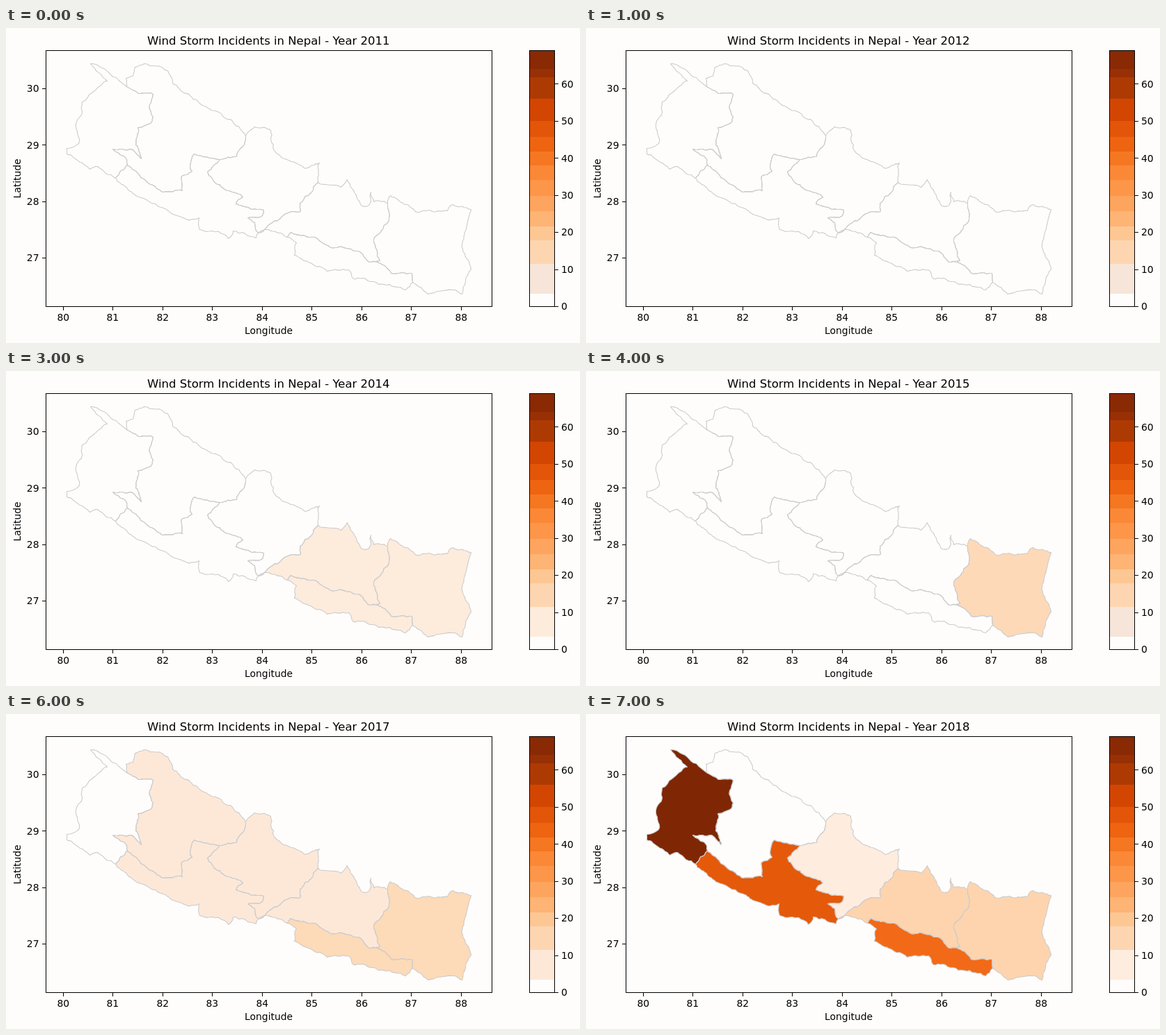
Recreate the animation shown at these times as an HTML page with a canvas. Size 825x454 px, loop 8000 ms.

```html
<!DOCTYPE html>
<html lang="en">
<head>
<meta charset="utf-8">
<title>Wind Storm Incidents</title>
<style>
  html, body { margin: 0; width: 825px; height: 454px; overflow: hidden; background: #fefdfc; }
  canvas, svg { position: absolute; left: 0; top: 0; display: block; }
  text { font: 13.89px "DejaVu Sans", sans-serif; fill: #000; }
  #title { font-size: 16.5px; }
</style>
</head>
<body>
<canvas id="map" width="825" height="454"></canvas>
<svg id="labels" width="825" height="454"></svg>
<script>
const ctx = document.getElementById("map").getContext("2d");
const labels = document.getElementById("labels");
const PAPER = "#fefdfc", EDGE = "#cccccc";
const PLOT = { x: 57.5, y: 32.5, w: 641, h: 369 };
const BAR = { x: 752.5, y: 32.5, w: 36, h: 369 };
const STEP = 1000;

let seed = 7;
const random = () => (seed = (seed * 16807) % 2147483647) / 2147483647;

// Splits a segment again and again, nudging each midpoint sideways.
function roughen([ax, ay], [bx, by]) {
  const dx = bx - ax, dy = by - ay, length = Math.hypot(dx, dy);
  if (length < 5) return [[bx, by]];
  const kink = (random() - 0.5) * Math.min(0.3, 4 / length);
  const middle = [(ax + bx) / 2 - dy * kink, (ay + by) / 2 + dx * kink];
  return [...roughen([ax, ay], middle), ...roughen(middle, [bx, by])];
}

const borders = {};
function border(name, corners) {
  const keys = corners.split(" ").map(corner => corner.split(",").map(Number));
  borders[name] = keys.flatMap((key, i) => i ? roughen(keys[i - 1], key) : [key]);
}

border("farWestOuter", "157,216 131,199 120,203 87,181 87,173 104,166 100,138 108,125 109,106 123,93 145,76 121,51 131,53 158,71 173,84");
border("midWestOuter", "173,84 172,72 182,69 185,56 198,51 232,61 239,79 279,109 322,131 344,155");
border("westOuter", "344,155 357,142 380,147 384,175 430,202 450,194 448,222");
border("centralOuter", "448,222 481,229 490,218 511,256 520,256 524,236 528,250 548,252");
border("eastOuter", "548,252 552,241 593,265 634,263 642,254 668,261 656,318 668,347 655,383 641,377 606,383 584,366");
border("southEastOuter", "584,366 574,377 512,360 499,361 492,348 461,350 414,327 417,309 404,301");
border("centralSouth", "404,301 376,290 362,295");
border("southOuter", "362,295 359,302 326,292 319,303 313,297 278,290 277,273 258,275 222,258 188,242 157,216");
border("farWest/south", "157,216 174,197");
border("farWest/midWest", "174,197 169,184 153,174 167,174 180,174 194,188 186,168 189,143 207,137 211,128 206,110 211,95 190,94 173,84");
border("midWest/south", "174,197 207,225 225,236 253,234 252,213 267,206 264,199 270,181 307,189");
border("midWest/west", "307,189 331,185 344,155");
border("west/south", "307,189 289,207 302,224 340,243 330,253 370,262 368,270 347,273 357,280 362,295");
border("west/central", "362,295 373,288 405,266 423,264 422,252 438,237 448,222");
border("central/southEast", "404,301 409,294 447,303 462,313 505,321 524,337");
border("central/east", "524,337 537,335 528,304 549,279 548,252");
border("east/southEast", "524,337 545,343 553,353 583,353 584,366");

// A leading "-" walks the border backwards.
function region(...names) {
  const path = new Path2D();
  for (const name of names) {
    const points = name[0] === "-" ? [...borders[name.slice(1)]].reverse() : borders[name];
    for (const [x, y] of points) path.lineTo(x + 0.5, y + 0.5);
  }
  path.closePath();
  return path;
}

const regions = {
  farWest: region("farWestOuter", "-farWest/midWest", "-farWest/south"),
  midWest: region("midWestOuter", "-midWest/west", "-midWest/south", "farWest/midWest"),
  south: region("southOuter", "farWest/south", "midWest/south", "west/south"),
  west: region("westOuter", "-west/central", "-west/south", "midWest/west"),
  central: region("centralOuter", "-central/east", "-central/southEast", "centralSouth", "west/central"),
  southEast: region("southEastOuter", "central/southEast", "east/southEast"),
  east: region("eastOuter", "-east/southEast", "central/east")
};

// "low" is the colour of the lowest band on the scale; fills name it by null.
const years = [
  { low: "#f6e5d8", fills: {} },
  { low: "#f6e5d8", fills: {} },
  { low: "#fdebdc", fills: { southEast: null, east: null } },
  { low: "#fdebdc", fills: { southEast: null, east: null, central: null } },
  { low: "#f6e5d8", fills: { east: "#fdd9b8" } },
  { low: "#fdeadb", fills: { west: null, central: null, southEast: null, east: null } },
  { low: "#fde8d8", fills: { midWest: null, south: null, west: null, central: null,
      southEast: "#fddab8", east: "#fddab8" } },
  { low: "#feecdf", fills: { farWest: "#7f2704", south: "#e5590b", west: null,
      central: "#fdd4ae", southEast: "#f26a17", east: "#fdd4ae" } }
];

// Each band runs from its top edge down to the next one.
const bands = [
  [32, "#892a04"], [59, "#973005"], [71, "#ae3a03"], [102, "#d34601"], [134, "#e35509"],
  [157, "#ee6410"], [178, "#f57722"], [198, "#fb8836"], [219, "#fd9649"], [242, "#fda55e"],
  [264, "#fdb475"], [286, "#fdc794"], [306, "#fdd6b1"], [340, null], [383, PAPER]
];

function label(text, x, y, anchor = "middle") {
  const node = document.createElementNS("http://www.w3.org/2000/svg", "text");
  node.setAttribute("x", x);
  node.setAttribute("y", y);
  node.setAttribute("text-anchor", anchor);
  node.textContent = text;
  labels.append(node);
  return node;
}

const title = label("", 377.3, 24);
title.id = "title";
label("Longitude", 377.6, 441);
label("Latitude", 21, 217).setAttribute("transform", "rotate(-90 21 217)");

const ticks = new Path2D();
function tick(x, y, dx, dy) {
  ticks.moveTo(x, y);
  ticks.lineTo(x + dx, y + dy);
}
function sideTick(text, x, y, dx, labelX, anchor) {
  tick(x, Math.round(y) + 0.5, dx, 0);
  label(text, labelX, Math.round(y + 5.3), anchor);
}
for (let lon = 80; lon <= 88; lon++) {
  const x = Math.round(81.9 + (lon - 80) * 71.5);
  tick(x + 0.5, 402, 0, 5);
  label(lon, x + 0.3, 422);
}
for (let lat = 27; lat <= 30; lat++) sideTick(lat, 57, 331.1 - (lat - 27) * 81.33, -5, 47.5, "end");
for (let n = 0; n <= 60; n += 10) sideTick(n, 789, 401 - n * 5.342, 5, 798, "start");

function draw(index) {
  const { low, fills } = years[index];
  ctx.fillStyle = PAPER;
  ctx.fillRect(0, 0, 825, 454);

  for (const [name, color] of Object.entries(fills)) {
    ctx.fillStyle = color || low;
    ctx.fill(regions[name]);
  }
  ctx.lineJoin = "round";
  ctx.lineWidth = 1.1;
  ctx.strokeStyle = EDGE;
  for (const path of Object.values(regions)) ctx.stroke(path);

  bands.forEach(([top, color], i) => {
    const bottom = i + 1 < bands.length ? bands[i + 1][0] : 401;
    ctx.fillStyle = color || low;
    ctx.fillRect(BAR.x, top, BAR.w, bottom - top);
  });

  ctx.lineJoin = "miter";
  ctx.lineWidth = 1;
  ctx.strokeStyle = "#000";
  for (const box of [PLOT, BAR]) ctx.strokeRect(box.x, box.y, box.w, box.h);
  ctx.stroke(ticks);
  title.textContent = `Wind Storm Incidents in Nepal - Year ${2011 + index}`;
}

let shown = -1;
const start = performance.now();
function update() {
  const elapsed = Math.max(0, performance.now() - start);
  const index = Math.floor(elapsed / STEP) % years.length;
  if (index !== shown) draw(shown = index);
  requestAnimationFrame(update);
}
update();
</script>
</body>
</html>
```
